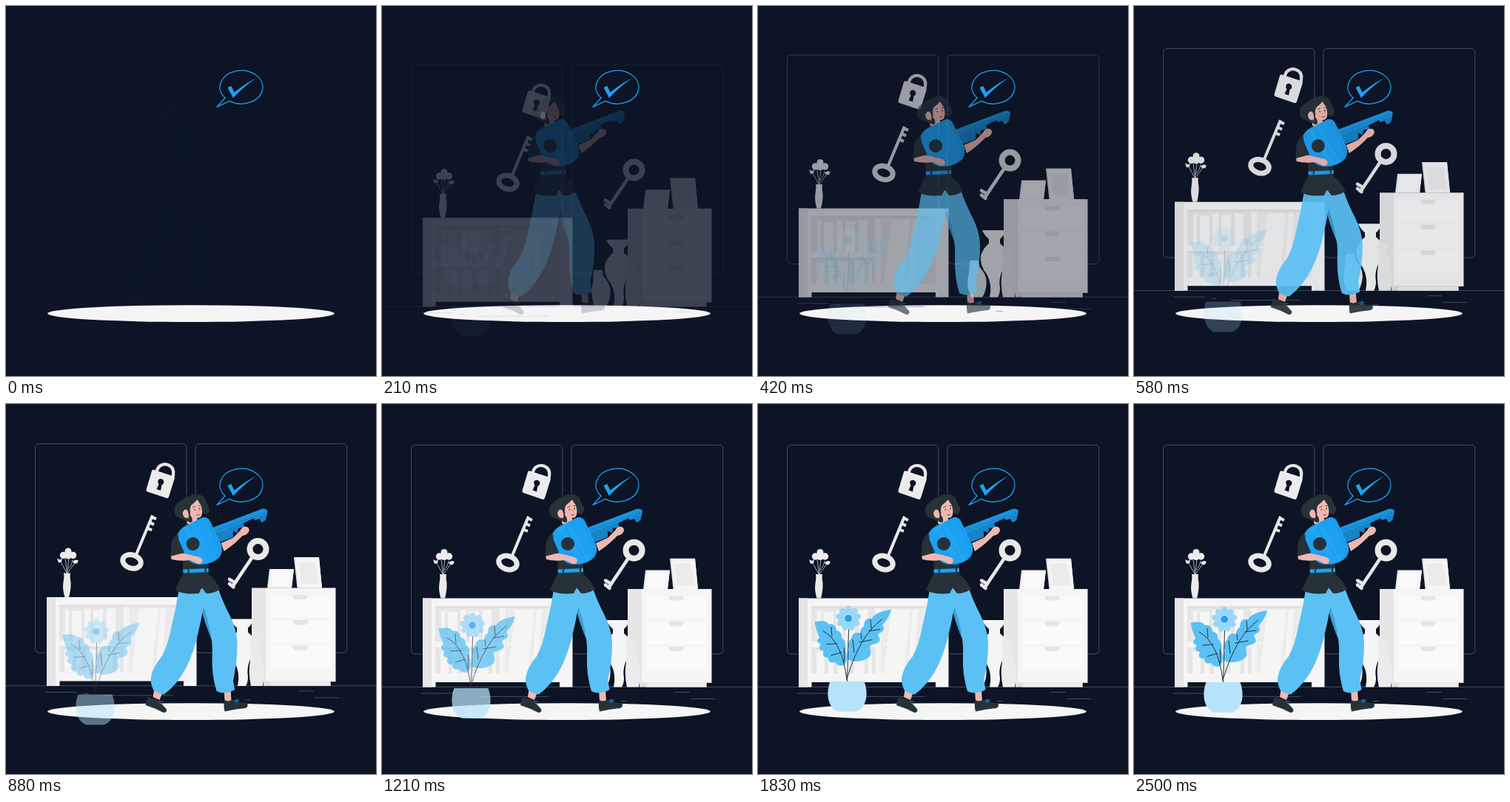
Animation, 500 px wide and 500 px high, one loop 2540 ms. Source, as an HTML page:

```html
<!DOCTYPE html>
<html lang="en">
<head>
<meta charset="utf-8">
<style>
html, body { margin: 0; width: 100%; height: 100%; overflow: hidden; background: #0c1425; }
svg { display: block; width: 100vw; height: 100vh; }
.line { fill: none; stroke: #565d6a; stroke-width: .8; }
.white { fill: #f5f5f5; }
.pale { fill: #ebebeb; }
.side { fill: #e6e6e6; }
.grey { fill: #e0e0e0; }
.snow { fill: #fafafa; }
.night { fill: #0c1425; }
.dark { fill: #263238; }
.blue { fill: #1da1f2; }
.sky { fill: #5bc0f4; }
.skin { fill: #efb8b0; }
.vein { fill: none; stroke: #263238; stroke-width: 1; stroke-linecap: round; }
</style>
</head>
<body>
<svg viewBox="0 0 500 500">
  <ellipse class="white" cx="250" cy="415.6" rx="194" ry="11.4"/>

  <g id="room" opacity="0">
    <g class="line">
      <rect x="39.5" y="55.4" width="204.5" height="282.4" rx="5"/>
      <rect x="256" y="55.4" width="204.7" height="282.4" rx="5"/>
      <path d="M0 382.4H500M53 391H96M104.500 393H111M131 395.400H225M396 389.500H416M417 398.500H450M322 401.500H331"/>
    </g>

    <!-- bookcase -->
    <path class="white" d="M55 262.500H257.500V382.500H240V376H72.500V382.500H55Z"/>
    <path class="side" d="M55 262.500H66.500V382.500H55ZM72 273H158.500V364H72Z"/>
    <path class="pale" d="M166 273H240V364H166Z"/>
    <path class="grey" d="M72 273H240V276H72ZM66.300 263H67V382.500H66.300ZM72 329H158.500V331H72Z"/>
    <path class="white" d="M80 279H85V321H80ZM89 281H102V321H89ZM106 278H114V321H106ZM118 280H131V321H118ZM136 278H148V321H136ZM79 335H90V364H79ZM95 333H102V364H95ZM108 334H122V364H108ZM130 333H144V364H130ZM149 334H154V364H149Z"/>
    <path class="white" d="M72 321H158.500V329H72ZM180 278H206L197 364H170ZM209 278H216L210 364H202Z"/>
    <path fill="none" stroke="#fafafa" stroke-width="1.5" d="M168 322Q172 327 176 322"/>

    <!-- flower vase -->
    <g class="pale">
      <path d="M78 230H87Q86 234 87.500 242Q88 252 85 262.500H79.500Q76 252 77.500 242Q79 234 78 230Z"/>
      <path d="M82 230L73 213M82.500 230L80 210M82.500 230L85 210M83 230L94 215M83 225Q89 220 90 212" fill="none" stroke="#d5d5d5" stroke-width=".8"/>
      <circle cx="77.500" cy="206" r="4.700"/><circle cx="84" cy="200.500" r="4.500"/><circle cx="90.500" cy="206" r="4.700"/><circle cx="84" cy="207" r="4"/>
      <path d="M69 210L73 212L76 210L75 215L71 216ZM90 214L94 212L98 213L96 217L92 217Z"/>
    </g>

    <!-- tall vases -->
    <path class="pale" d="M286 333H298Q297 340 303 346Q311 356 308 370Q306 379 303 382.500H288Q280 366 285 350Z"/>
    <path class="white" d="M303 292H334Q333 299 327 304V310Q337 317 336 329Q334 341 329 349Q325 360 327 370Q327 378 324 382.500H313Q317 365 309 351Q300 341 301 327Q304 316 312 310V304Q306 299 303 292Z"/>

    <!-- dresser and picture frames -->
    <path class="side" d="M332 250H351V376.500H332Z"/>
    <path class="grey" d="M348 376H438.500V382.500H348Z"/>
    <path class="pale" d="M357 377H438.500V382.500H357Z"/>
    <path class="white" d="M351 250H445.500V376.500H351Z"/>
    <path class="snow" d="M356 260H439V290H356ZM356 294H439V324.500H356ZM356 328H439V358.500H356Z"/>
    <path class="side" d="M387 259.500H408Q408 265.500 404 265.500H391Q387 265.500 387 259.500ZM387 293.500H408Q408 300 404 300H391Q387 300 387 293.500ZM387 328H408Q408 334 404 334H391Q387 334 387 328ZM332 376H445.500V376.800H332Z"/>
    <path class="side" d="M356 224.500H389L386 250H353ZM389 208.700H423L427 250H393.500Z"/>
    <path class="white" d="M357.500 225H389L386 250H355ZM391 209H423L427 250H395.500Z"/>
    <path class="snow" d="M362 229H383.500L381 247H358.500Z"/>
    <path class="pale" d="M395.500 215H418.500L421.500 245H398.500Z"/>
    <path class="pale" d="M330 319Q337 314 342 321Q344 328 340 332Q348 340 347.500 356Q349 372 347 382.500H331Q327 365 330 348Q329 340 332 332Q328 326 330 319Z"/>

    <!-- padlock -->
    <path fill="none" stroke="#e8e8e8" stroke-width="4.200" d="M203.500 95C204 86 211 81.500 218 83.500C226 86 228 92 225 102"/>
    <path class="pale" d="M200 90.500L226 99Q228.500 100 227.800 102L220 127Q219 129.500 216.500 128.700L191 120Q189 119 189.600 117L197 92Q198 89.800 200 90.500Z"/>
    <path class="night" d="M205.500 104.500A4.300 4.300 0 1 1 210.500 111L209 118.500L203.500 116.500L206.500 110Q204.500 107.500 205.500 104.500Z"/>

    <!-- loose keys -->
    <g fill="none" stroke="#e8e8e8">
      <ellipse cx="170" cy="214.500" rx="12.500" ry="9" stroke-width="7" transform="rotate(17 170 214.500)"/>
      <path d="M175.500 206L198 152" stroke-width="4"/>
      <path d="M196 154L203 157M193 161L200 164.500M190 169L197 172" stroke-width="4"/>
      <circle cx="340.500" cy="197.700" r="11" stroke-width="8"/>
      <path d="M332.500 209L306 248.500" stroke-width="4.600"/>
      <path d="M309.500 243L302 238.500M307.500 249L302 244.500" stroke-width="4.500" stroke-linecap="round"/>
    </g>
  </g>

  <g id="woman" opacity="0">
    <!-- legs -->
    <path class="skin" d="M199 383L211 387L206 400L197 396ZM293 385H302L303 402H294Z"/>
    <path class="dark" d="M190.500 395Q195 399 201 398Q209 405 215 412Q217 417 211 417Q200 411 187 407Q188 400 190.500 395ZM293.500 400Q299 403 304 399.500Q314 404 324 404Q327 409 322 411Q308 412 294 415.500Q292 408 293.500 400Z"/>
    <path fill="none" stroke="#1da1f2" stroke-width=".8" d="M204 402L211 402M206 404L210 406M306 401L314 400M308 403L313 402M310 398L310 403"/>
    <path fill="#3b9fd2" d="M258 260L280 262L294 325L277 320Q268 300 262 276Z"/>
    <path class="sky" d="M232 251Q228 277 222 301Q217 327 209 341Q194 359 194 374Q195 382 198 387Q206 392 212 392.500Q230 379 242 356Q253 334 259 305Q264 285 265.500 268L264 249Z"/>
    <path class="sky" d="M260 249H285Q291 267 301 286Q310 304 311 322Q311 353 305 372L307.500 386Q300 391 288 390L283 388Q276 366 277 341Q279 310 263 268Z"/>

    <!-- torso -->
    <path class="dark" d="M236 170Q224 177 222 190L221 206L237 211L238 229Q231 240 227.500 251.500Q238 258 259 256L263 248L269 256Q280 256 288 250Q282 238 272 230V200L264 160L247 155Z"/>
    <path class="blue" d="M237.500 223.500L272 222V227L238 228.500Z"/>
    <path class="dark" d="M244 222.500H246V229H244ZM267 221.500H269V228H267Z"/>

    <!-- head -->
    <path class="dark" d="M226 145Q225 135 235 131Q239 126 246 125Q250 121 259 122Q269 125 269 133Q274 139 272 147Q268 151 264 147L257 134L247 141L250 156Q246 162 240 157Q236 154 231 153.500Q226 151 226 145Z"/>
    <path class="skin" d="M245 148L256 150L258 162Q251 168 243 161Z"/>
    <path class="skin" d="M247 142Q248 133 257 129Q263 135 263.500 146Q263 154 258 154Q250 154 247 151Z"/>
    <path class="skin" d="M245 146Q243 141 239.500 143Q236 146 238 151Q240 156 245 153Z"/>
    <path class="dark" d="M240 142Q250 137 257 129Q259 134 264 138Q268 143 264 147Q268 151 272 147Q275 141 269 134Q268 126 258 124Q245 123 240 142ZM243 142Q249 144 247 150Q251 154 250 159Q246 162 243 157Q248 152 243 142Z"/>
    <path fill="none" stroke="#263238" stroke-width=".8" d="M250.500 139.500L254 138.500M258.500 137.500L261.500 137.500M255.500 149.500Q259 152 260.500 148.500"/>
    <circle class="dark" cx="253.300" cy="142.800" r=".9"/><circle class="dark" cx="260" cy="141.500" r=".9"/>
    <path d="M257.500 142L259.500 146L257 146.500" fill="none" stroke="#d98680" stroke-width=".7"/>

    <!-- giant key -->
    <path class="skin" d="M289 188L305 181L314 172L319 166Q327 165 327 171Q325 177 318 178Q308 189 293 199Z"/>
    <path fill="#1b94df" d="M275 168L345 141.500Q351 141 352 145L349 157L344 160L341 155L335 157L333 154L319 161L320 166L312 168L311 174L305 171V180L289 186L279 182Z"/>
    <path fill="#1782c6" d="M279 175L350 148.500L351 151L349 157L344 160L341 155L335 157L333 154L319 161L320 166L312 168L311 174L305 171V180L289 186L284 181Z"/>
    <path fill="none" stroke="#0d6eaa" stroke-width=".7" d="M279 172L350 146"/>
    <path class="skin" d="M316 169Q319 165 324 166.500Q328 168 326 173L318 177Q314 174 316 169Z"/>
    <path class="blue" d="M262 154Q270 151 274 158L288 187Q293 198 287 207Q278 216 263 217Q248 217 241 207L231 184Q228 174 237 167Z"/>
    <path fill="#3aaff5" d="M237 167L242 164L275 213L267 216.500ZM247 161L250 159.500L281 211L278 212.500Z" opacity=".25"/>
    <path fill="none" stroke="#1a8ed6" d="M269 155L284 186Q289 198 284 208"/>
    <circle class="dark" cx="251" cy="189" r="9"/>

    <!-- near arm -->
    <path class="skin" d="M221 204Q232 200 244 203L256 206Q264 207 264 213Q261 218 256 215L247 211Q234 213 222 210Z"/>
    <path class="dark" d="M231 177Q223 177 221.500 191L220.500 206L235 202L239 200L232 184Z"/>
  </g>

  <g id="plant" opacity="0">
    <path class="sky" d="M76.500 296Q91 292 96 299Q104 297 106 307Q114 309 113 317Q120 322 118 332Q123 344 117 354Q108 357 104 350Q95 353 95 344Q85 344 89 335Q79 333 85 326Q76 322 83 317Q79 308 76.500 296Z"/>
    <path class="sky" d="M180 279Q159 282 154 291Q143 289 143 302Q138 304 138 311Q128 308 126 318Q119 325 123 333Q119 343 122 347Q134 352 146 346Q155 341 152 334Q149 328 155 326Q167 324 164 317Q160 312 166 310Q173 306 168 300Q177 291 180 279Z"/>
    <path class="vein" d="M122.500 306L120.500 376M88 308Q114 322 120 374M100 316L99 303M107 325L93 326M113 337L99 341M116.500 350V331M168 292Q138 313 121 370M153 305L152 293M150 308L165 306M140 319L139 311M137 323L154 320M130 337L128 320"/>
    <g id="petals" fill="#98d7f9"></g>
    <circle class="blue" cx="122.200" cy="291" r="5"/>
    <path fill="#b7e3fa" d="M97.500 376H143.500Q148 388 146 400Q143 413 133 417H108Q98 413 95 400Q93 387 97.500 376Z"/>
  </g>

  <g stroke="#1da1f2">
    <path fill="none" stroke-width="1.300" d="M296 124.300A29 22.400 0 1 1 302 128.400L284.600 136.700Z"/>
    <path class="blue" stroke="none" d="M299.500 110.300L304.300 108L308.500 116.800Q323 105 338.500 97Q321 109 307 124.300Z"/>
  </g>
</svg>
<script>
const LOOP = 2540, FPS = 24, LEAD = 30, TRAVEL = 30;
const room = document.getElementById('room');
const woman = document.getElementById('woman');
const plant = document.getElementById('plant');

document.getElementById('petals').innerHTML = Array.from({ length: 9 }, (_, i) =>
  `<ellipse cx="122.200" cy="279.800" rx="4.500" ry="6" transform="rotate(${i * 40} 122.200 291)"/>`).join('');

// cubic-bezier(.36, -.01, .5, 1.38)
const curve = (a, b, s) => 3 * a * s * (1 - s) ** 2 + 3 * b * s * s * (1 - s) + s ** 3;
function ease(x) {
  if (x >= 1) return 1;
  let low = 0, high = 1;
  for (let i = 0; i < 24; i++) {
    const mid = (low + high) / 2;
    if (curve(.36, .5, mid) < x) low = mid; else high = mid;
  }
  return curve(-.01, 1.38, low);
}

function enter(group, progress, dx, dy) {
  const rest = TRAVEL * (1 - progress);
  group.setAttribute('transform', `translate(${dx * rest} ${dy * rest})`);
  group.setAttribute('opacity', Math.min(1, Math.max(0, progress)));
}

function draw() {
  const now = performance.now() % LOOP;
  const time = Math.floor(now * FPS / 1000 + .1) * 1000 / FPS + LEAD;
  const fast = ease(time / 1000);
  enter(room, fast, 0, 1);
  enter(woman, fast, -1, 0);
  enter(plant, ease(time / 2500), 0, 1);
  requestAnimationFrame(draw);
}
draw();
</script>
</body>
</html>
```
